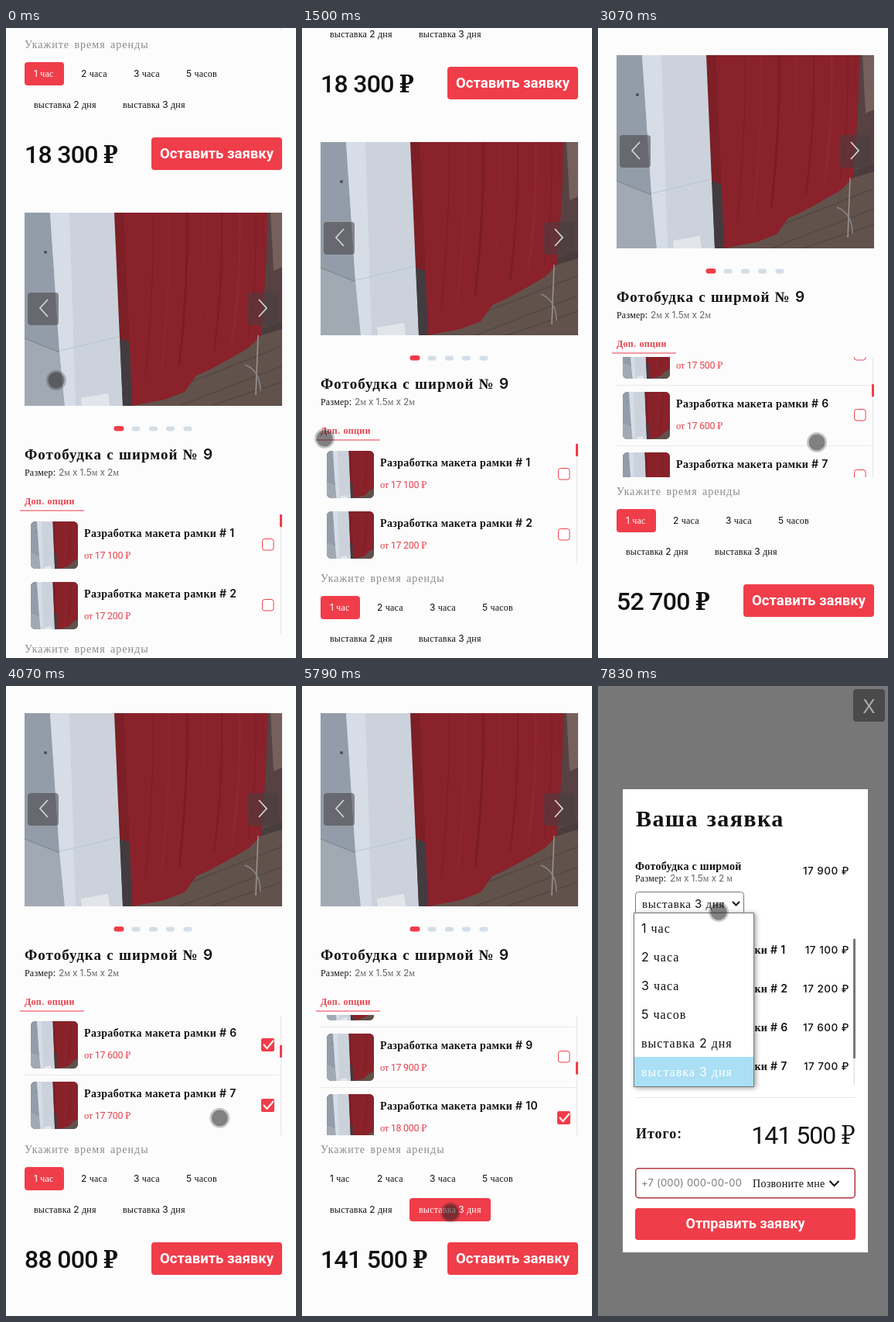
Animation of 375 by 812 pixels, one loop 8 s. Source, as an HTML page:

```html
<!DOCTYPE html>
<html lang="ru">
<head>
<meta charset="utf-8">
<style>
  html, body { margin: 0; width: 100%; height: 100%; overflow: hidden; background: #fcfcfc; }
  svg { display: block; width: 375px; height: 812px; }
  text { font-family: "Liberation Serif", "Noto Serif", serif; fill: #111; }
  tspan { font-family: Inter, sans-serif; }
  .bold { font-weight: 700; }
  .bold tspan { font-weight: 600; }
  .sans { font-family: Inter, sans-serif; }
  .medium { font-weight: 500; }
  .roboto { font-family: Roboto, sans-serif; font-weight: 700; }
  .slab tspan { font-family: Roboto, sans-serif; }
  .slab.bold tspan { font-weight: 500; }
</style>
</head>
<body>
<svg id="stage" viewBox="0 0 375 812" xmlns="http://www.w3.org/2000/svg"></svg>
<script>
const RED = '#f03d4a', GREY = '#7b7b7b';
const LOOP = 8000, PITCH = 78, CARD_PITCH = 779, LIST_TOP = 424, LIST_HEIGHT = 155, ITEMS = 20;
const times = ['1 час', '2 часа', '3 часа', '5 часов', 'выставка 2 дня', 'выставка 3 дня'];

// ---- drawing helpers ----
const runs = str => str.replace(/[\d#x.:+()-]+/g, '<tspan>$&</tspan>');

function text(x, y, str, size, { cls = '', fill = '#111', ls = 0, ws = 0, anchor = 'start', id = '' } = {}) {
  return `<text id="${id}" x="${x}" y="${y}" class="${cls}" font-size="${size}" text-anchor="${anchor}"
    style="fill:${fill};letter-spacing:${ls}px;word-spacing:${ws}px">${runs(str)}</text>`;
}
const rect = (x, y, w, h, fill, extra = '') =>
  `<rect x="${x}" y="${y}" width="${w}" height="${h}" fill="${fill}" ${extra}/>`;
const path = (d, fill, extra = '') => `<path d="${d}" fill="${fill}" ${extra}/>`;
const line = (d, stroke, width = 1) => path(d, 'none', `stroke="${stroke}" stroke-width="${width}"`);
const money = n => String(n).replace(/\B(?=(\d{3})+$)/g, ' ') + ' ₽';
const itemName = n => `Разработка макета рамки # ${n}`;
const itemPrice = n => 17000 + n * 100;

// ---- photo of the booth ----
function photo() {
  const folds = [158, 179, 202, 224, 247, 270, 291].map((x, i) =>
    line(`M${x + 8} 0 Q${x + 10} 90 ${x - 2} ${215 - i * 9}`, i % 2 ? '#90272e' : '#7a1d24', i % 3 + 1)).join('');
  return `<symbol id="photo" viewBox="0 0 333 249" preserveAspectRatio="xMinYMid slice">
    ${rect(0, 0, 333, 249, '#493c3c')}
    ${path('M120 249 L150 205 L333 150 V249 Z', '#62524c')}
    ${line('M200 249 L333 198 M240 249 L333 218 M190 228 L333 172', '#544742', 1.5)}
    ${path('M305 0 H333 V140 L300 152 Z', '#574142')}
    ${path('M318 0 H333 V70 L322 75 Z', '#75605c')}
    ${path('M0 0 H36 L54 249 H0 Z', '#939daa')}
    ${path('M0 162 L45 180 L52 249 H0 Z', '#a1a9b3')}
    ${line('M0 162 L45 180', '#77828e')}
    ${path('M33 0 H117 L127 249 H52 L45 178 Z', '#cbd2dc')}
    ${path('M33 0 H58 L66 249 H52 L45 178 Z', '#d6dde6')}
    ${line('M46 178 L122 160', '#bcc4ce')}
    ${path('M73 239 L108 233 L110 249 H74 Z', '#e2e6eb')}
    ${path('M116 0 H140 L139 168 L123 162 Z', '#7c1f26')}
    ${path('M123 162 L139 168 V249 H127 Z', '#423b40')}
    ${path(`M128 0 H314 Q313 80 306 158 L290 174 L262 190 L240 202 L222 210
      L207 231 L181 241 L139 249 L135 150 Z`, '#89222a')}
    ${folds}
    ${line('M302 158 L299 235', '#9c9694', 1.5)}
    ${line('M285 196 Q305 204 305 230', '#8a8482', 1.5)}
    <circle cx="27" cy="51" r="2" fill="#4a5058"/>
  </symbol>`;
}

// ---- rental page ----
function controls(price, id) {
  const spots = [[36, 639], [97, 639], [165, 639], [233, 639], [36, 679], [151, 679]];
  return text(24, 602, 'Укажите время аренды', 14, { fill: '#8b8b8b', ls: 1, ws: 2 })
    + rect(24, 620, 51, 30, RED, `rx="4" id="${id}Chip"`)
    + times.map((label, i) => text(...spots[i], label, 12,
        { ls: .2, fill: i ? '#111' : '#fff', id: `${id}Time${i}` })).join('')
    + text(24, 750, money(price), 32, { cls: 'slab bold', ls: -.7, id: id + 'Price' })
    + rect(188, 717, 169, 42, RED, 'rx="4"')
    + text(272.5, 744, 'Оставить заявку', 18.5, { cls: 'roboto', fill: '#fff', anchor: 'middle' });
}

function listItem(n) {
  return `<g transform="translate(0 ${433 + (n - 1) * PITCH})">
    ${n > 3 ? rect(24, -9, 330, 1, '#e9e9e9') : ''}
    <g clip-path="url(#thumb)"><use href="#photo" x="32" width="61" height="61"/></g>
    ${text(101, 20, itemName(n), 14, { cls: 'bold', ls: .35 })}
    ${text(101, 48, 'от ' + money(itemPrice(n)), 12.5, { cls: 'slab', fill: '#e5434f', ls: -.3 })}
    ${rect(331.5, 22.5, 14.5, 14.5, '#fff', `rx="3" stroke="${RED}"`)}
    <g id="check${n}">${rect(330, 22, 17, 17, RED, 'rx="2"')}${line('M333 30 L337.5 35 L346 25', '#fff', 2)}</g>
  </g>`;
}

const arrow = (x, d) => rect(x, 138, 40, 42, '#463f43', 'rx="4" opacity=".55"') + line(d, '#d6d6d6', 1.7);

function page() {
  const dots = [168, 190.5, 212.5, 235].map(x => rect(x - 5.5, 310.5, 11, 6, '#d5dde6', 'rx="3"')).join('');
  const items = Array.from({ length: ITEMS }, (_, i) => listItem(i + 1)).join('');
  return `<g id="page">
    <g transform="translate(0 ${-CARD_PITCH})">${controls(18300, 'prev')}${rect(355, 425, 1, 154, '#e6e6e6')}</g>
    <use href="#photo" x="24" y="35" width="333" height="249"/>
    ${arrow(28, 'M54 147 L44 158 L54 169')}${arrow(313, 'M327 147 L337 158 L327 169')}
    ${rect(139.5, 310, 13, 6.5, RED, 'rx="3.2"')}${dots}
    ${text(24, 353, 'Фотобудка с ширмой № 9', 19, { cls: 'bold', ls: 1, ws: .5 })}
    ${text(24, 374, 'Размер:', 12, { ls: .2 })}
    ${text(68, 374, '2м x 1.5м x 2м', 12, { fill: '#666' })}
    ${text(24, 411, 'Доп. опции', 12, { cls: 'bold', fill: '#e5434f', ls: .3 })}
    ${rect(18, 418.5, 83, 1, RED)}
    <g clip-path="url(#listBox)">
      <g id="list">${items}</g>
      ${rect(355, 425, 1, 154, '#e6e6e6')}${rect(354, 424, 3, 16, RED, 'id="thumbBar"')}
    </g>
    ${controls(18400, 'main')}
  </g>`;
}

// ---- order form ----
function priceTag(y, value) {
  return text(325, y, money(value), 13.5, { cls: 'sans medium', ls: .5, anchor: 'end' });
}

function modal() {
  const rows = [1, 2, 6, 7].map((n, i) =>
    text(48, 345 + i * 50, itemName(n), 14, { cls: 'bold', ls: .35 }) + priceTag(345 + i * 50, itemPrice(n))).join('');
  return `<g id="modal">
    ${rect(0, 0, 375, 812, '#777')}
    ${rect(330, 4, 41, 42, '#4a4a4a', 'rx="4"')}
    ${text(350.5, 35, 'X', 24, { cls: 'sans', fill: '#aaa', anchor: 'middle' })}
    ${rect(32, 133, 317, 597, '#fff')}
    ${text(49, 181, 'Ваша заявка', 30, { cls: 'bold', ls: 1.4, ws: 2 })}
    ${text(48, 237, 'Фотобудка с ширмой', 14, { cls: 'bold', ls: .3 })}${priceTag(243, 17900)}
    ${text(48, 252, 'Размер:', 12, { ls: .2 })}
    ${text(93, 252, '2м x 1.5м x 2 м', 12, { fill: '#666' })}
    ${rect(48.5, 265.5, 140, 30, '#fff', 'rx="4" stroke="#777"')}
    ${text(57, 286, times[5], 15, { ls: .7 })}
    ${line('M174 278 L178.5 282.5 L183 278', '#111', 2)}
    ${rows}
    ${rect(330.5, 326, 1.5, 188, '#e2e2e2')}${rect(330, 326, 3, 154, '#777')}
    ${rect(48, 530, 285, 1, '#e8e8e8')}
    ${text(49, 583, 'Итого:', 18, { cls: 'bold', ls: 1 })}
    ${text(332, 590, money(141500), 32, { cls: 'slab', ls: -1, anchor: 'end' })}
    ${rect(48.75, 621.75, 283.5, 38, '#fff', 'rx="4" stroke="#b53440" stroke-width="1.5"')}
    ${text(56, 645, '+7 (000) 000-00-00', 13, { cls: 'sans', fill: GREY, ls: .2 })}
    ${text(200, 646, 'Позвоните мне', 14, { ls: .3 })}
    ${line('M299.5 638 L305.5 644 L311.5 638', '#111', 2)}
    ${rect(48, 673, 285, 41, RED, 'rx="4"')}
    ${text(190.5, 699, 'Отправить заявку', 18, { cls: 'roboto', fill: '#fff', anchor: 'middle' })}
    ${rect(189, 718, 169, 42, '#33b5e5', 'id="tap"')}
  </g>`;
}

function dropdown() {
  return `<g id="dropdown">
    ${rect(46.5, 292.5, 155, 224, '#fff', 'stroke="#777" style="filter:drop-shadow(2px 1px 3px #0006)"')}
    ${rect(47, 478, 154, 38, '#aadff5')}
    ${times.map((label, i) => text(56, 318 + i * 37, label, 16,
      { ls: 1, fill: i === 5 ? '#fff' : '#111' })).join('')}
  </g>`;
}

const stage = document.getElementById('stage');
stage.innerHTML = `<defs>${photo()}
    <clipPath id="thumb"><rect x="32" width="61" height="61" rx="6"/></clipPath>
    <clipPath id="listBox"><rect x="18" y="${LIST_TOP}" width="340" height="${LIST_HEIGHT}"/></clipPath>
  </defs>${page()}${modal()}${dropdown()}
  <g id="cursor"><circle r="13" fill="#222" opacity=".24"/><circle r="10.5" fill="#222" opacity=".42"/></g>`;

// ---- motion ----
const $ = id => document.getElementById(id);
const show = (id, on) => { $(id).style.display = on ? '' : 'none'; };
const move = (id, x, y) => $(id).setAttribute('transform', `translate(${x} ${y})`);

// Keys are [time, ...values]; values ease between neighbouring keys.
function at(keys, t) {
  const next = keys.findIndex(k => k[0] > t);
  if (next < 0) return keys[keys.length - 1].slice(1);
  if (next === 0) return keys[0].slice(1);
  const a = keys[next - 1], b = keys[next];
  const p = (t - a[0]) / (b[0] - a[0]), e = p * p * (3 - 2 * p);
  return a.slice(1).map((v, i) => v + (b[i + 1] - v) * e);
}

const cursorKeys = [
  [120, 65, 454], [330, 76, 470], [640, 23, 515], [880, 30, 529], [1780, 29, 529], [2090, 275, 468],
  [2300, 275, 468], [2520, 283, 534], [3260, 283, 534], [3500, 283, 562], [3910, 283, 562],
  [4300, 265, 548], [4950, 265, 548], [5430, 185, 671], [5680, 185, 671], [6200, 244, 736],
  [6430, 244, 736], [6730, 280, 640], [7210, 256, 372], [7250, 256, 372], [7570, 156, 291]];
const pageKeys = [[1270, 203], [1765, 0]];
const listKeys = [[2690, 0], [3090, 356], [3910, 356], [4600, 608.5]];
const checkedAt = { 1: 2280, 2: 2600, 6: 3200, 7: 3600, 10: 4810 };
const PLAN_AT = 5650, MODAL_AT = 6430, DROPDOWN_AT = 7790;

function render(t) {
  move('cursor', ...at(cursorKeys, t));
  move('page', 0, Math.round(at(pageKeys, t)[0]));
  const scroll = Math.round(at(listKeys, t)[0]);
  move('list', 0, -scroll);
  move('thumbBar', 0, scroll * LIST_HEIGHT / (ITEMS * PITCH));

  const longPlan = t >= PLAN_AT;
  let total = longPlan ? 53900 : 18400;
  for (let n = 1; n <= ITEMS; n++) {
    const on = t >= checkedAt[n];
    show('check' + n, on);
    if (on) total += itemPrice(n);
  }
  $('mainPrice').innerHTML = runs(money(total));

  const chip = $('mainChip');
  chip.setAttribute('x', longPlan ? 139 : 24);
  chip.setAttribute('y', longPlan ? 660 : 620);
  chip.setAttribute('width', longPlan ? 105 : 51);
  $('mainTime0').style.fill = longPlan ? '#111' : '#fff';
  $('mainTime5').style.fill = longPlan ? '#fff' : '#111';

  show('modal', t >= MODAL_AT);
  show('dropdown', t >= DROPDOWN_AT);
  $('tap').setAttribute('opacity', .42 * at([[MODAL_AT + 60, 1], [MODAL_AT + 220, 0]], t)[0]);
}

const start = performance.now();
function frame() {
  render((performance.now() - start) % LOOP);
  requestAnimationFrame(frame);
}
frame();
</script>
</body>
</html>
```
